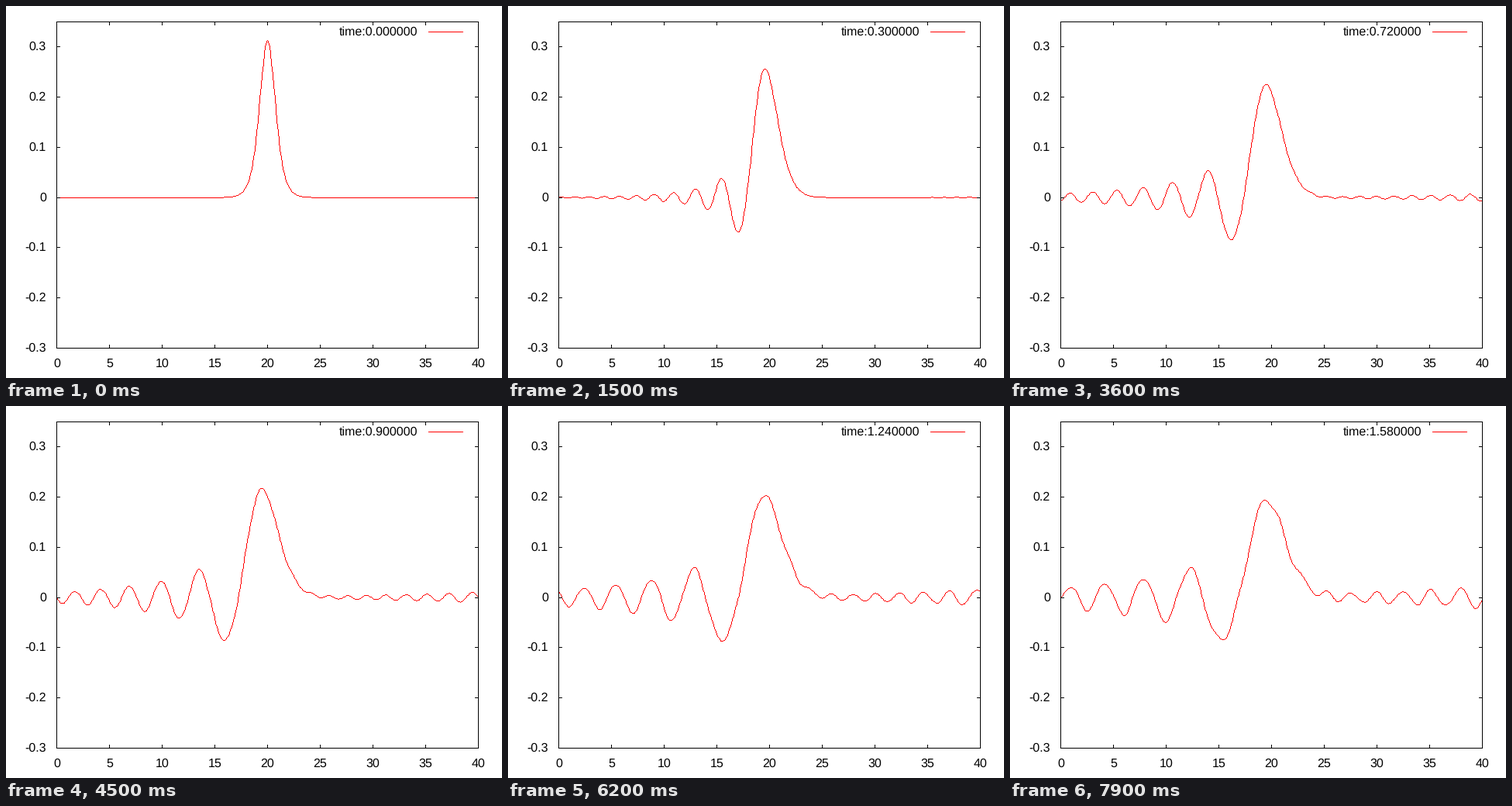
Write a matplotlib script that moves like this. It is 640 px wide and 480 px high and loops after 8 s.

```python
import numpy as np
import matplotlib.pyplot as plt
from matplotlib.animation import FuncAnimation

W, H, DPI = 640, 480, 80
PX = 72 / DPI                                # one pixel in points
LEFT, RIGHT, TOP, BOTTOM = 65, 609, 20, 441  # plot box
LENGTH, Y_MIN, Y_MAX = 40, -0.3, 0.35
FRAMES, STEP, SUBSTEPS = 80, 0.02, 100
N = 400

plt.rcParams["font.family"] = "Liberation Sans"
plt.rcParams["text.hinting"] = "none"
plt.rcParams["path.simplify"] = False


def solve_kdv():
    """u_t + 6 u u_x + u_xxx = 0, periodic; leapfrog with central differences."""
    h = LENGTH / N
    dt = STEP / SUBSTEPS

    def rhs(u):
        r1, l1 = np.roll(u, -1), np.roll(u, 1)
        r2, l2 = np.roll(u, -2), np.roll(u, 2)
        return (-(l1 + u + r1) * (r1 - l1) / h
                - (r2 - 2 * r1 + 2 * l1 - l2) / (2 * h**3))

    n = 1 / 4
    x = np.arange(N) * h
    u = n * (n + 1) / np.cosh(x - LENGTH / 2)**2
    old = u - dt * rhs(u - dt / 2 * rhs(u))
    states = []
    for _ in range(FRAMES):
        states.append(u)
        for _ in range(SUBSTEPS):
            old, u = u, old + 2 * dt * rhs(u)
    return states


def px_x(x):
    return np.rint(LEFT + np.asarray(x) * (RIGHT - LEFT) / LENGTH)


def px_y(u):
    scale = (BOTTOM - TOP) / (Y_MAX - Y_MIN)
    return np.rint(BOTTOM - (np.asarray(u) - Y_MIN) * scale)


fig = plt.figure(figsize=(W / DPI, H / DPI), dpi=DPI, facecolor="white")
ax = fig.add_axes([0, 0, 1, 1])
ax.set_xlim(0, W)
ax.set_ylim(H, 0)
ax.axis("off")


def stroke(xs, ys, color="black", z=3, cap="projecting", width=1):
    return ax.plot(xs, ys, color=color, lw=width * PX, antialiased=False,
                   zorder=z, solid_capstyle=cap, solid_joinstyle="miter",
                   snap=False)[0]


def label(x, y, text, ha):
    return ax.text(x, y, text, ha=ha, va="baseline", fontsize=16 * PX,
                   color="black", zorder=4)


x0, x1, y0, y1 = LEFT + 0.5, RIGHT + 0.5, TOP + 0.5, BOTTOM + 0.5
stroke([x0, x1, x1, x0, x0], [y0, y0, y1, y1, y0])

for value in range(0, LENGTH + 1, 5):
    x = px_x(value) + 0.5
    stroke([x, x], [y1, y1 - 4])
    stroke([x, x], [y0, y0 + 4])
    label(x, 466, str(value), "center")

for i in range(-3, 4):
    y = px_y(i / 10) + 0.5
    stroke([x0, x0 + 4], [y, y])
    stroke([x1, x1 - 4], [y, y])
    label(52, y + 4.5, f"{i / 10:g}" if i else "0", "right")

stroke([545, 590], [33.5, 33.5], "red", 2, "butt")
title = label(531.5, 38, "", "right")

states = solve_kdv()
grid = px_x(np.linspace(0, LENGTH, N + 1))
cols = np.arange(LEFT, RIGHT + 1)
gap = np.full(len(cols), np.nan)


def column_runs(u):
    """Crisp one-pixel curve: a vertical run of whole pixels per column."""
    ys = px_y(np.append(u, u[0]))
    mid = np.interp(cols, grid, ys)
    a = np.interp(cols - 0.5, grid, ys)
    b = np.interp(cols + 0.5, grid, ys)
    low = np.minimum(np.ceil(np.minimum(a, b)), np.rint(mid))
    high = np.maximum(np.ceil(np.maximum(a, b)) - 1, np.rint(mid))
    return np.column_stack([low + 0.05, high + 0.95, gap]).ravel()


curve = stroke(np.repeat(cols + 0.5, 3), column_runs(states[0]), "red", 2,
               "butt", 0.9)


def draw(frame):
    curve.set_ydata(column_runs(states[frame]))
    title.set_text(f"time:{frame * STEP:f}")
    return curve, title


anim = FuncAnimation(fig, draw, frames=FRAMES, interval=100, repeat=True,
                     repeat_delay=0)
plt.show()
```
